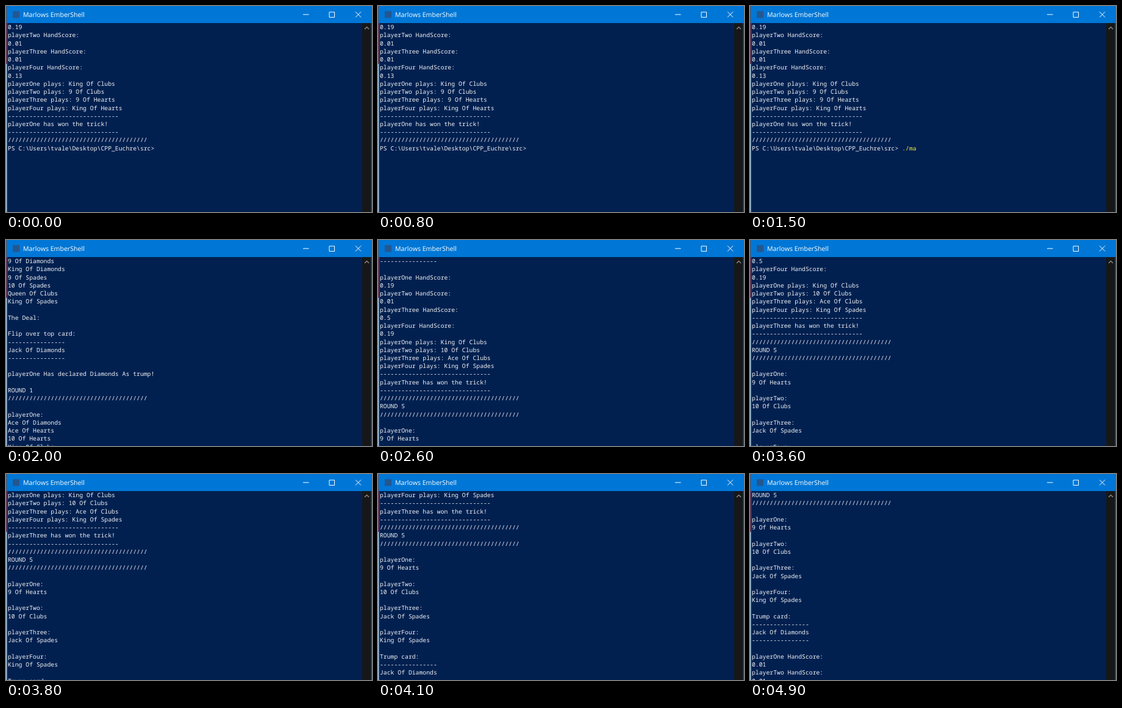
An HTML page for the animation above (5000 ms loop, 600 by 338 pixels).

```html
<!DOCTYPE html>
<html lang="en">
<head>
<meta charset="utf-8">
<style>
  html, body { margin: 0; width: 100%; height: 100%; overflow: hidden; background: #012050; }
  #stage { position: relative; width: 600px; height: 338px; overflow: hidden; background: #012050; }
  svg { position: absolute; left: 0; top: 0; }
  #title { font: 10.6px "Open Sans", "Noto Sans", sans-serif; fill: #fff; text-rendering: geometricPrecision; }
  /* Set large and scaled down, so that lines can sit between whole pixels */
  pre {
    position: absolute; left: 2.6px; top: 27.7px; margin: 0; color: #f2f1f3;
    font: 500 39.08px/52.96px "Noto Sans Mono", "DejaVu Sans Mono", monospace;
    font-variant-ligatures: none; text-rendering: geometricPrecision;
    transform: scale(.25); transform-origin: 0 0;
  }
  #command { color: #f6ee3a; }
</style>
</head>
<body>
<div id="stage">
  <pre><span id="output"></span><span id="command"></span></pre>
  <svg width="600" height="338" fill="none">
    <path fill="#0077d6" d="M0 0H600V28H0z"/>
    <path fill="#171717" d="M584 28H598.5V338H584z"/>
    <path fill="#0a55a0" d="M598.5 28H600V338H598.5z"/>
    <path fill="#4a5a70" d="M0 0H1.5V28H0z"/>
    <path fill="#8a3a4a" d="M0 28H1.5V95H0z"/>
    <path fill="#c8d8e4" d="M0 95H1.5V338H0z"/>
    <path fill="#0a55a0" d="M1.5 28H2.5V338H1.5z"/>
    <path fill="#24568f" d="M11 8.5H22V19.5H11z"/>
    <text id="title" x="28" y="18">Marlows EmberShell</text>
    <path stroke="#fff" d="M487 14H496.5M530 10H538.5V18.5H530zM573 9.5L582 18.5M582 9.5L573 18.5"/>
    <path stroke="#8c8c8c" stroke-width="1.4" d="M588 38L591.5 34.5L595 38"/>
  </svg>
</div>
<script>
const LOOP = 5000, STEP = 100, ROWS = 24;
const players = ["One", "Two", "Three", "Four"].map(n => "player" + n);
const slashes = "/".repeat(39), rule = "-".repeat(31), shortRule = "-".repeat(16);
const ranks = { 9: "9", T: "10", J: "Jack", Q: "Queen", K: "King", A: "Ace" };
const suits = { C: "Clubs", D: "Diamonds", H: "Hearts", S: "Spades" };
const card = c => ranks[c[0]] + " Of " + suits[c[1]];
const cards = list => list.split(" ").map(card);

const trump = [shortRule, card("JD"), shortRule, ""];
const hands = ["AD AH TH KC 9H", "QD 9C JH TC TC", "TD QH AS AC JS", "JC QS KH KS KS"].map(cards);
const scores = [
  [0.5, 0.19, 0.13, 0.19],
  [0.13, 0.01, 0.19, 0.5],
  [0.19, 0.13, 0.5, 0.01],
  [0.19, 0.01, 0.5, 0.19],
  [0.01, 0.01, 0.5, 0.19]
];
const winners = [0, 0, 2, 2, 2];

const trick = (score, plays, winner) => [
  ...players.flatMap((p, i) => [p + " HandScore:", score[i]]),
  ...players.map((p, i) => `${p} plays: ${plays[i]}`),
  rule, players[winner] + " has won the trick!", rule, slashes
];

const playRound = (score, n) => [
  "ROUND " + (n + 1), slashes, "",
  ...players.flatMap((p, i) => [p + ":", ...hands[i].slice(n), ""]),
  "Trump card:", ...trump,
  ...trick(score, hands.map(h => h[n]), winners[n])
];

const idle = [
  ...trick([0.19, 0.01, 0.01, 0.13], cards("KC 9C 9H KH"), 0).slice(1),
  "PS C:\\Users\\tvale\\Desktop\\CPP_Euchre\\src> "
];

const game = [
  ...cards("9D KD 9S TS QC KS"), "", "The Deal:", "",
  "Flip over top card:", ...trump,
  "playerOne Has declared Diamonds As trump!", "",
  ...scores.flatMap(playRound)
];

// Scroll position as [time, top line]
const last = game.indexOf("ROUND 5") - 18;
const scroll = [
  [1900, 0], [2000, 0], [2500, last], [3000, last],
  [3400, last + 4], [3800, last + 10], [4600, last + 18], [LOOP, last + 18]
];

function topLine(t) {
  const i = scroll.findIndex(p => t < p[0]);
  const [t0, y0] = scroll[i - 1], [t1, y1] = scroll[i];
  return Math.floor(y0 + (y1 - y0) * (t - t0) / (t1 - t0));
}

const output = document.getElementById("output");
const command = document.getElementById("command");

function draw(now) {
  const t = Math.floor(now % LOOP / STEP) * STEP;
  const typing = t < 1900;
  const top = typing ? 0 : topLine(t);
  output.textContent = (typing ? idle : game.slice(top, top + ROWS)).join("\n");
  command.textContent = typing ? "./main".slice(0, Math.max(0, t / STEP - 11)) : "";
  requestAnimationFrame(draw);
}
draw(performance.now());
</script>
</body>
</html>
```
